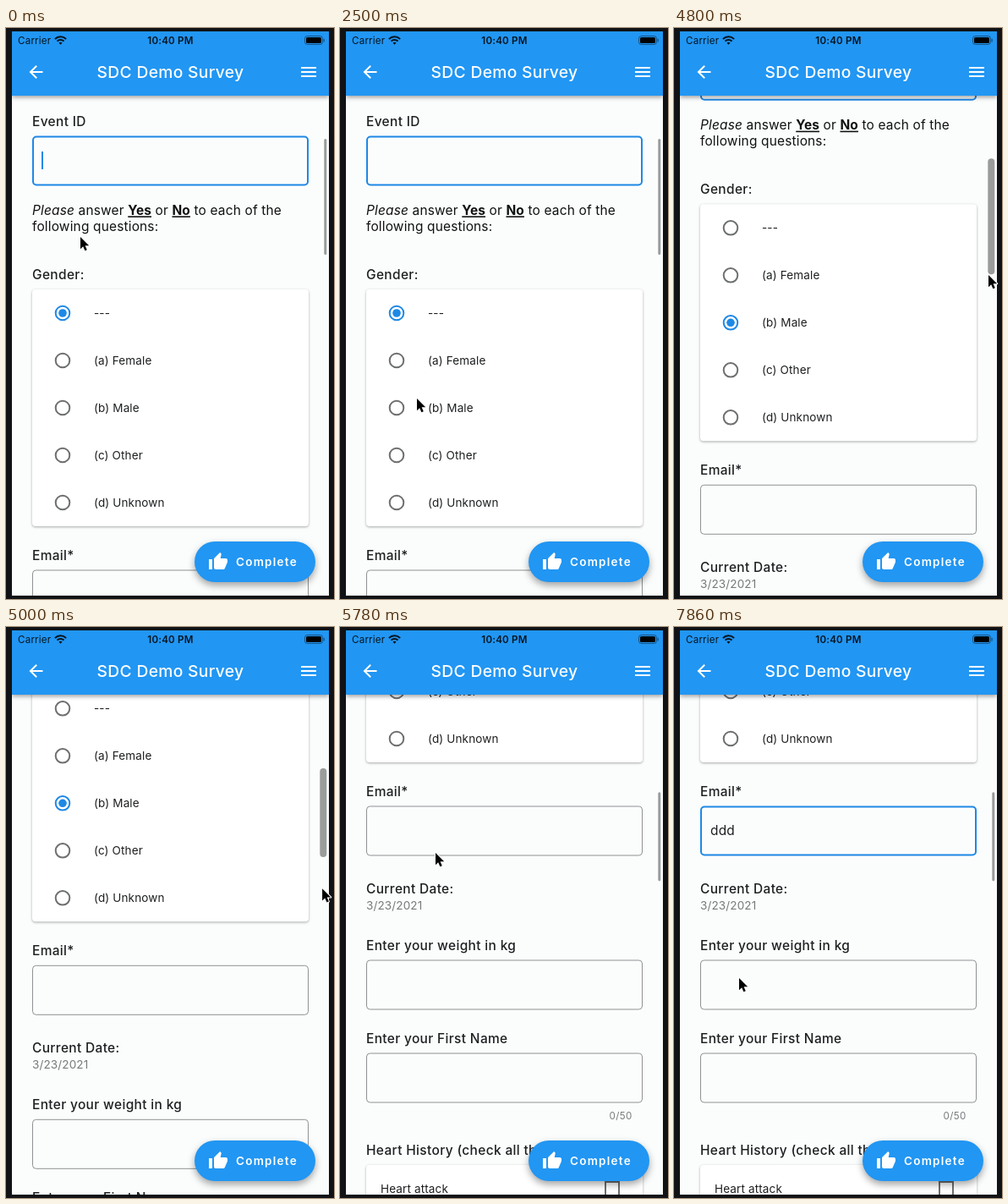
Recreate the animation shown at these times as an HTML page with a canvas. Size 388 px wide and 675 px high, loop 8000 ms.

```html
<!DOCTYPE html>
<html lang="en">
<head>
<meta charset="utf-8">
<title>Survey form</title>
<style>
  html, body { margin: 0; width: 100%; height: 100%; overflow: hidden; background: #111215; }
  canvas { display: block; width: 388px; height: 675px; }
</style>
</head>
<body>
<canvas id="stage"></canvas>
<script>
const W = 388, H = 675, LOOP = 8000;
const BLUE = '#2196f3', ACCENT = '#1e88e5', INK = '#1d1f20', GREY = '#77797a', PAGE = '#fbfdfd';
const canvas = document.getElementById('stage');
const ctx = canvas.getContext('2d');
const dpr = window.devicePixelRatio || 1;
canvas.width = W * dpr;
canvas.height = H * dpr;

// [size, weight, letter spacing]
const TITLE = [19.3, 500, 0.3];
const LABEL = [15.46, 500, 0.35];
const BODY = [15.46, 400, 0.17];
const SMALL = [13.53, 400, 0.13];

const ICONS = {
  back: new Path2D('M20 11H7.83l5.59-5.59L12 4l-8 8 8 8 1.41-1.41L7.83 13H20z'),
  menu: new Path2D('M3 18h18v-2H3zM3 13h18v-2H3zM3 6v2h18V6z'),
  thumb: new Path2D('M1 21h4V9H1zM23 10c0-1.1-.9-2-2-2h-6.31l.95-4.57.03-.32c0-.41-.17-.79-.44-1.06L14.17 1 7.59 7.59C7.22 7.95 7 8.45 7 9v10c0 1.1.9 2 2 2h9c.83 0 1.54-.5 1.84-1.22l3.02-7.05c.09-.23.14-.47.14-.73z'),
  arrow: new Path2D('M0 0V14.2L3.2 11.2L5.4 16.3L7.8 15.3L5.6 10.3H10.2Z')
};

// Keys: [time, value, ...]
const POINTER = [
  [0, 88, 247], [900, 88, 247], [2100, 91, 436], [2500, 91, 438], [2850, 76, 447],
  [3200, 76, 447], [4000, 358, 244], [4350, 371, 269], [4600, 372, 270],
  [4800, 372, 292], [5250, 377, 333], [5420, 377, 336], [5780, 113, 267],
  [6150, 108, 241], [6900, 108, 241], [7600, 77, 415]
];
const SCROLL = [[4600, 0], [4800, 100], [5250, 415], [5400, 429]];
const GRIP = [[4380, 0], [4500, 1], [5450, 1], [5640, 0]];
const PICK_AT = 2950, FOCUS_AT = 6200, TYPED_AT = [6550, 7000, 7320];

const smooth = k => k * k * (3 - 2 * k);
const linear = k => k;

function track(keys, t, ease) {
  if (t <= keys[0][0]) return keys[0].slice(1);
  for (let i = 1; i < keys.length; i++) {
    const a = keys[i - 1], b = keys[i];
    if (t < b[0]) {
      const k = ease((t - a[0]) / (b[0] - a[0]));
      return a.slice(1).map((v, j) => v + (b[j + 1] - v) * k);
    }
  }
  return keys[keys.length - 1].slice(1);
}

function text(str, x, y, [size, weight, gap], color = INK, align = 'left', style = '') {
  ctx.font = `${style} ${weight} ${size}px Inter, Roboto, sans-serif`;
  ctx.letterSpacing = gap + 'px';
  ctx.textAlign = align;
  ctx.fillStyle = color;
  ctx.fillText(str, x, y);
  return ctx.measureText(str).width;
}

function rounded(x, y, w, h, r) {
  ctx.beginPath();
  ctx.roundRect(x, y, w, h, r);
}

function shaded(color, blur, dy, alpha, draw) {
  ctx.save();
  ctx.shadowColor = `rgba(0,0,0,${alpha})`;
  ctx.shadowBlur = blur * dpr;
  ctx.shadowOffsetY = dy * dpr;
  ctx.fillStyle = color;
  draw();
  ctx.fill();
  ctx.restore();
}

function icon(path, x, y, color = '#fff') {
  ctx.save();
  ctx.translate(x, y);
  ctx.fillStyle = color;
  ctx.fill(path);
  ctx.restore();
}

function field(y, focused) {
  const w = focused ? 2 : 1, d = w / 2;
  rounded(31 + d, y + d, 327 - w, 59 - w, 4);
  ctx.lineWidth = w;
  ctx.strokeStyle = focused ? ACCENT : '#8f9192';
  ctx.stroke();
}

function caret(x, y) {
  ctx.fillStyle = ACCENT;
  ctx.fillRect(x, y, 2, 21);
}

function card(y, h) {
  shaded('#fff', 3, 1, 0.34, () => rounded(31, y, 327, h, 4));
}

function radio(y, label, on) {
  ctx.strokeStyle = on ? ACCENT : '#6d6f70';
  ctx.lineWidth = 2;
  ctx.beginPath();
  ctx.arc(67, y, 8.3, 0, 7);
  ctx.stroke();
  if (on) {
    ctx.fillStyle = ACCENT;
    ctx.beginPath();
    ctx.arc(67, y, 4.8, 0, 7);
    ctx.fill();
  }
  text(label, 104, y + 5, SMALL);
}

function instructions() {
  const bold = [15.46, 700, 0.1];
  const runs = [['Please', BODY, 'italic'], [' answer ', BODY], ['Yes', bold], [' or ', BODY],
    ['No', bold], [' to each of the', BODY]];
  let x = 31;
  for (const [str, font, style] of runs) {
    const w = text(str, x, 221, font, '#111', 'left', style);
    if (font === bold) ctx.fillRect(x, 222.3, w, 1.6);
    x += w;
  }
  text('following questions:', 31, 240, BODY, '#111');
}

function form(t) {
  text('Event ID', 31, 115.5, LABEL);
  field(127.5, t < FOCUS_AT);
  if (t < FOCUS_AT && (t + 200) % 1000 < 500) caret(42, 146);
  instructions();

  text('Gender:', 31, 297, LABEL);
  card(309, 280);
  const picked = t < PICK_AT ? 0 : 2;
  ['---', '(a) Female', '(b) Male', '(c) Other', '(d) Unknown']
    .forEach((s, i) => radio(337 + 56 * i, s, i === picked));

  text('Email*', 31, 628.5, LABEL);
  field(640.5, t >= FOCUS_AT);
  const typed = TYPED_AT.filter(at => t >= at);
  const width = text('d'.repeat(typed.length), 43, 674.5, BODY);
  const since = t - (typed.length ? typed[typed.length - 1] : FOCUS_AT);
  if (since >= 0 && since % 1000 < 500) caret(42 + width, 659);

  text('Current Date:', 31, 743.5, LABEL);
  text('3/23/2021', 31, 763, SMALL, GREY);
  text('Enter your weight in kg', 31, 810.5, LABEL);
  field(822.5);
  text('Enter your First Name', 31, 920.5, LABEL);
  field(932.5);
  text('0/50', 345.5, 1010.5, [11.6, 400, 0.3], GREY, 'right');

  text('Heart History (check all that apply)', 31, 1052.5, LABEL);
  card(1065, 200);
  text('Heart attack', 48, 1097.5, SMALL);
  ctx.strokeStyle = '#6d6f70';
  ctx.lineWidth = 2;
  ctx.strokeRect(314, 1085, 16, 16);
}

function scrollbar(offset, grip) {
  const far = offset > 180;
  const w = 3 + 5 * grip;
  rounded(379.3 - w, 131 + offset * (far ? 0.15 : 0.23), w, far ? 105 : 137, w / 2);
  ctx.fillStyle = 'rgba(0,0,0,.39)';
  ctx.fill();
}

function statusBar() {
  const dark = '#07151f';
  text('Carrier', 14, 19, [11.6, 400, 0.2], dark);
  text('10:40 PM', 194.5, 19, [11.6, 600, 0.2], dark, 'center');
  ctx.strokeStyle = ctx.fillStyle = dark;
  ctx.lineWidth = 2;
  const up = -Math.PI / 2;
  for (const r of [9.2, 5.6]) {
    ctx.beginPath();
    ctx.arc(64.5, 19.5, r, up - 0.8, up + 0.8);
    ctx.stroke();
  }
  ctx.beginPath();
  ctx.moveTo(64.5, 19.8);
  ctx.arc(64.5, 19.8, 3, up - 0.75, up + 0.75);
  ctx.fill();

  rounded(353.5, 9.5, 21, 10, 3);
  ctx.lineWidth = 1;
  ctx.strokeStyle = 'rgba(7,21,31,.5)';
  ctx.stroke();
  rounded(355, 11, 18, 7, 1.6);
  ctx.fillStyle = '#000';
  ctx.fill();
  ctx.fillStyle = 'rgba(7,21,31,.5)';
  ctx.fillRect(375.5, 12.8, 1.3, 3.6);
}

function appBar() {
  shaded(BLUE, 5, 2, 0.38, () => {
    ctx.beginPath();
    ctx.rect(7, 4, 375, 76);
  });
  statusBar();
  icon(ICONS.back, 23.5, 40);
  text('SDC Demo Survey', 194.5, 59, TITLE, '#fff', 'center');
  icon(ICONS.menu, 346, 40);
}

function completeButton() {
  shaded(BLUE, 9, 4, 0.36, () => rounded(223, 607, 143, 48, 24));
  icon(ICONS.thumb, 239, 619);
  text('Complete', 272, 636, [13.53, 600, 1.25], '#fff');
}

function pointer(x, y) {
  ctx.save();
  ctx.translate(x, y);
  ctx.lineJoin = 'round';
  ctx.lineWidth = 2;
  ctx.strokeStyle = '#fff';
  ctx.stroke(ICONS.arrow);
  ctx.fillStyle = '#000';
  ctx.fill(ICONS.arrow);
  ctx.restore();
}

function draw(t) {
  const [offset] = track(SCROLL, t, linear);
  const [grip] = track(GRIP, t, smooth);
  ctx.setTransform(dpr, 0, 0, dpr, 0, 0);
  ctx.fillStyle = '#111215';
  ctx.fillRect(0, 0, W, H);

  ctx.save();
  ctx.beginPath();
  ctx.rect(7, 4, 375, 667);
  ctx.clip();
  ctx.fillStyle = PAGE;
  ctx.fillRect(7, 4, 375, 667);
  ctx.save();
  ctx.translate(0, -offset);
  form(t);
  ctx.restore();
  scrollbar(offset, grip);
  appBar();
  completeButton();
  ctx.restore();

  pointer(...track(POINTER, t, smooth));
}

function tick() {
  draw(performance.now() % LOOP);
  requestAnimationFrame(tick);
}
tick();
</script>
</body>
</html>
```
